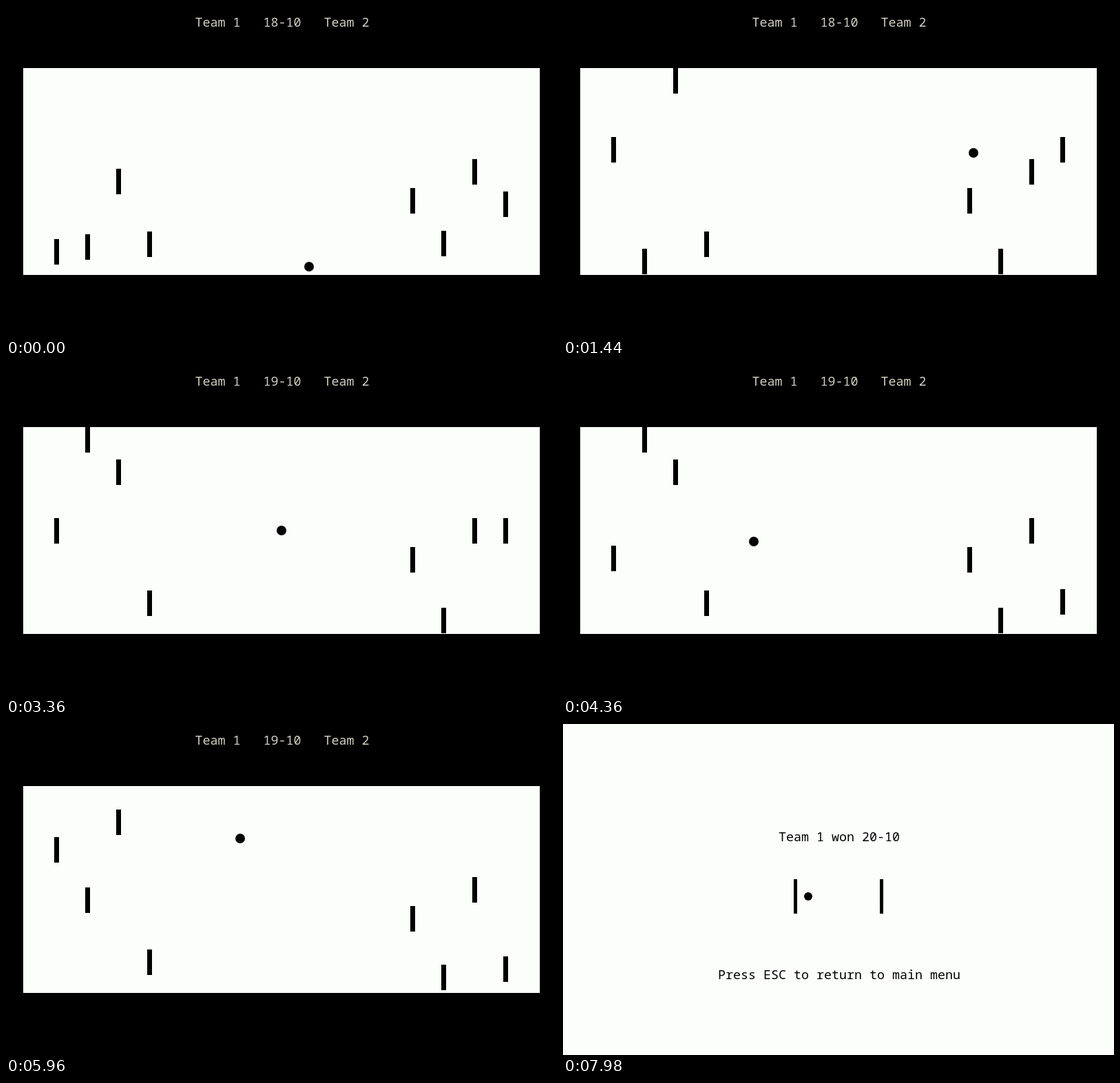
Write an HTML page with a canvas that moves like this. It is 800 px wide and 480 px high and loops after 8 s.

```html
<!DOCTYPE html>
<html>
<head>
<meta charset="utf-8">
<style>
  html, body { margin: 0; width: 100%; height: 100%; overflow: hidden; background: #000; }
  canvas { display: block; }
</style>
</head>
<body>
<canvas id="stage" width="800" height="480"></canvas>
<script>
const ctx = document.getElementById('stage').getContext('2d');
const PAPER = '#fcfefc', INK = '#000', SCORE = '#d2d0c0';
const LOOP = 8000, STEP = 20, GOAL = 2930, SERVE = 3924, WIN = 7500;
const FIELD = { x: 25, y: 90, w: 750, h: 300 };
const PADDLE = { w: 7, h: 37, speed: 0.3 };
const RADIUS = 7;
const TOP = FIELD.y, BOTTOM = FIELD.y + FIELD.h - PADDLE.h - 1, MIDDLE = 222;

// Straight flights [ms, x, y]; y runs on past the walls and is folded back.
const flights = [
  [20, 440, 378], [1440, 596, 785], [2420, 707, 1076], [GOAL, 765, 1228],
  [GOAL, 400, 240], [SERVE, 400, 240], [5044, 84, 282], [WIN, 770, -29.5]
];

// Each move [ms, goal] sends a paddle towards a height at constant speed.
const paddles = [
  { x: 70, start: 338, moves: [[20, BOTTOM], [120, TOP], [1107, BOTTOM], [2130, MIDDLE],
    [4200, 262], [5350, 164], [6200, TOP], [6840, 158]] },
  { x: 115, start: 331, moves: [[20, BOTTOM], [1617, TOP], [5000, 237], [6500, 290]] },
  { x: 160, start: 236, moves: [[20, TOP], [GOAL, 137], [5500, 124], [6000, TOP]] },
  { x: 205, start: 327, moves: [] },
  { x: 587, start: 264, moves: [] },
  { x: 632, start: 326, moves: [[20, BOTTOM], [4700, 349], [6663, 182]] },
  { x: 677, start: MIDDLE, moves: [] },
  { x: 722, start: 269, moves: [[20, 308], [150, TOP], [1107, BOTTOM], [2247, MIDDLE],
    [4017, 337], [5960, TOP]] }
];

const clamp = (v, low, high) => Math.min(high, Math.max(low, v));

// Reflects an unbounded height between the upper and lower walls.
function fold(y) {
  const top = FIELD.y + RADIUS, span = FIELD.h - 2 * RADIUS;
  const u = ((y - top) % (2 * span) + 2 * span) % (2 * span);
  return top + Math.min(u, 2 * span - u);
}

function ballAt(t) {
  const next = Math.max(1, flights.findIndex(([when]) => when > t));
  const [t0, x0, y0] = flights[next - 1], [t1, x1, y1] = flights[next];
  const k = Math.max(0, (t - t0) / (t1 - t0));
  return [x0 + (x1 - x0) * k, fold(y0 + (y1 - y0) * k)];
}

function paddleTop({ start, moves }, t) {
  return moves.reduce((y, [when, goal], i) => {
    const until = i + 1 < moves.length ? Math.min(t, moves[i + 1][0]) : t;
    const reach = Math.max(0, until - when) * PADDLE.speed;
    return y + clamp(goal - y, -reach, reach);
  }, start);
}

function rect(color, x, y, w, h) {
  ctx.fillStyle = color;
  ctx.fillRect(x, Math.round(y), w, h);
}

function disc(x, y, r) {
  ctx.fillStyle = INK;
  ctx.beginPath();
  ctx.arc(Math.round(x), Math.round(y), r, 0, 2 * Math.PI);
  ctx.fill();
}

function label(text, baseline, color) {
  ctx.font = '300 18.33px "Noto Sans Mono", monospace';
  ctx.textAlign = 'center';
  ctx.fillStyle = color;
  ctx.fillText(text, 401, baseline);
}

function drawMatch(t) {
  rect(INK, 0, 0, 800, 480);
  rect(PAPER, FIELD.x, FIELD.y, FIELD.w, FIELD.h);
  const gap = '\u00a0'.repeat(3);
  label(`Team 1${gap}${t < GOAL ? 18 : 19}-10${gap}Team 2`, 30, SCORE);
  for (const paddle of paddles) rect(INK, paddle.x, paddleTop(paddle, t), PADDLE.w, PADDLE.h);
  disc(...ballAt(t), RADIUS);
}

function drawResult(t) {
  rect(PAPER, 0, 0, 800, 480);
  label('Team 1 won 20-10', 170, INK);
  label('Press ESC to return to main menu', 370, INK);
  rect(INK, 335, 225, 5, 50);
  rect(INK, 460, 225, 5, 50);
  disc(400 - 44 * (t - WIN) / 480, 250, 6);
}

function draw(now) {
  const t = Math.floor(now % LOOP / STEP) * STEP;
  (t < WIN ? drawMatch : drawResult)(t);
  requestAnimationFrame(draw);
}
requestAnimationFrame(draw);
</script>
</body>
</html>
```
